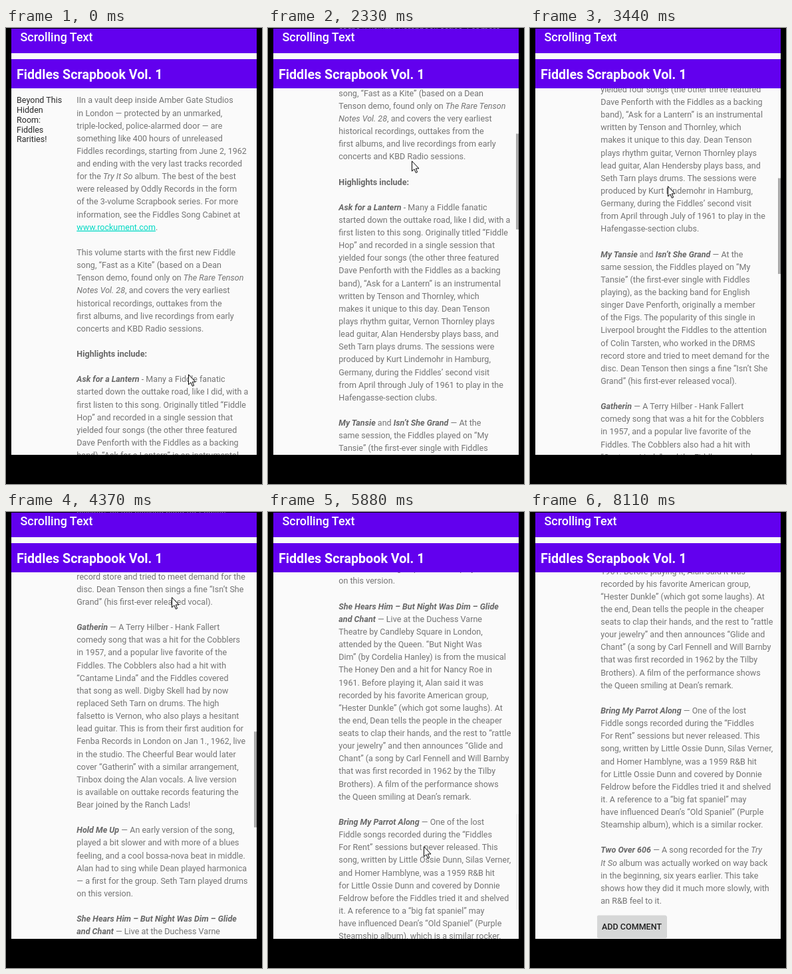
Write an HTML page that moves like this. It is 385 by 688 pixels and loops after 8980 ms.

```html
<!DOCTYPE html>
<html lang="en">
<head>
<meta charset="utf-8">
<title>Scrolling Text</title>
<style>
html, body { margin: 0; width: 100%; height: 100%; overflow: hidden; background: #000; }
svg { display: block; width: 100vw; height: 100vh; font-family: Roboto, sans-serif; font-size: 12.56px; }
#body { fill: #747474; }
#side { fill: #2a2a2a; }
.i { font-style: italic; }
.b { font-weight: 700; fill: #676767; }
.bi { font-weight: 700; font-style: italic; fill: #676767; }
.link { fill: #03dac5; text-decoration: underline; }
.head { fill: #fff; }
</style>
</head>
<body>
<svg viewBox="0 0 385 688">
  <rect width="385" height="688" fill="#000"/>
  <rect x="8" y="1" width="369" height="643" fill="#fafafa"/>
  <g id="page">
    <g id="side"></g>
    <g id="body" xml:space="preserve"></g>
    <g transform="translate(0 1550.5)">
      <rect x="101" y="609.5" width="105" height="33.5" rx="2" fill="#000" opacity=".16"/>
      <rect x="101" y="608.5" width="104.5" height="33.5" rx="2" fill="#d6d7d7"/>
      <text x="153" y="630" text-anchor="middle" font-weight="500" fill="#212121">ADD COMMENT</text>
    </g>
  </g>
  <rect id="bar" x="373" width="4" height="144.5" fill="#a9a9a9"/>
  <rect x="8" y="38" width="369" height="9" fill="#fafafa"/>
  <path d="M8 1H377V38H8ZM8 47H377V91H8Z" fill="#6200ee"/>
  <text class="head" x="21.5" y="20.3" font-size="17.94" font-weight="500">Scrolling Text</text>
  <text class="head" x="16" y="77" font-size="19.7" font-weight="700">Fiddles Scrapbook Vol. 1</text>
  <rect y="644" width="385" height="44" fill="#000"/>
  <path id="cursor" d="M.5 .8V16L4 12.8L6.4 18.4L8.6 17.4L6.3 12H11Z" fill="#fff" stroke="#000"/>
</svg>
<script>
const LOOP = 8980, PITCH = 19.133, BASE = 113.4;
const VIEW_TOP = 91, MAX_SCROLL = 1550.5, BAR_TRAVEL = 409;
const $ = id => document.getElementById(id);

// Inline marks: *bold italic*, _italic_, #bold#, ~link~
const article = `IIn a vault deep inside Amber Gate Studios
in London — protected by an unmarked,
triple-locked, police-alarmed door — are
something like 400 hours of unreleased
Fiddles recordings, starting from June 2, 1962
and ending with the very last tracks recorded
for the _Try It So_ album. The best of the best
were released by Oddly Records in the form
of the 3-volume Scrapbook series. For more
information, see the Fiddles Song Cabinet at
~www.rockument.com~.

 This volume starts with the first new Fiddle
song, “Fast as a Kite” (based on a Dean
Tenson demo, found only on _The Rare Tenson_
_Notes Vol. 28_, and covers the very earliest
historical recordings, outtakes from the
first albums, and live recordings from early
concerts and KBD Radio sessions.

 #Highlights include:#

 *Ask for a Lantern* - Many a Fiddle fanatic
started down the outtake road, like I did, with a
first listen to this song. Originally titled “Fiddle
Hop” and recorded in a single session that
yielded four songs (the other three featured
Dave Penforth with the Fiddles as a backing
band), “Ask for a Lantern” is an instrumental
written by Tenson and Thornley, which
makes it unique to this day. Dean Tenson
plays rhythm guitar, Vernon Thornley plays
lead guitar, Alan Hendersby plays bass, and
Seth Tarn plays drums. The sessions were
produced by Kurt Lindemohr in Hamburg,
Germany, during the Fiddles’ second visit
from April through July of 1961 to play in the
Hafengasse-section clubs.

 *My Tansie* and *Isn’t She Grand* — At the
same session, the Fiddles played on “My
Tansie” (the first-ever single with Fiddles
playing), as the backing band for English
singer Dave Penforth, originally a member
of the Figs. The popularity of this single in
Liverpool brought the Fiddles to the attention
of Colin Tarsten, who worked in the DRMS
record store and tried to meet demand for the
disc. Dean Tenson then sings a fine “Isn’t She
Grand” (his first-ever released vocal).

 *Gatherin* — A Terry Hilber - Hank Fallert
comedy song that was a hit for the Cobblers
in 1957, and a popular live favorite of the
Fiddles. The Cobblers also had a hit with
“Cantame Linda” and the Fiddles covered
that song as well. Digby Skell had by now
replaced Seth Tarn on drums. The high
falsetto is Vernon, who also plays a hesitant
lead guitar. This is from their first audition for
Fenba Records in London on Jan 1., 1962, live
in the studio. The Cheerful Bear would later
cover “Gatherin” with a similar arrangement,
Tinbox doing the Alan vocals. A live version
is available on outtake records featuring the
Bear joined by the Ranch Lads!

 *Hold Me Up* — An early version of the song,
played a bit slower and with more of a blues
feeling, and a cool bossa-nova beat in middle.
Alan had to sing while Dean played harmonica
— a first for the group. Seth Tarn played drums
on this version.

 *She Hears Him – But Night Was Dim – Glide*
*and Chant* — Live at the Duchess Varne
Theatre by Candleby Square in London,
attended by the Queen. “But Night Was
Dim” (by Cordelia Hanley) is from the musical
The Honey Den and a hit for Nancy Roe in
1961. Before playing it, Alan said it was
recorded by his favorite American group,
“Hester Dunkle” (which got some laughs). At
the end, Dean tells the people in the cheaper
seats to clap their hands, and the rest to “rattle
your jewelry” and then announces “Glide and
Chant” (a song by Carl Fennell and Will Barnby
that was first recorded in 1962 by the Tilby
Brothers). A film of the performance shows
the Queen smiling at Dean’s remark.

 *Bring My Parrot Along* — One of the lost
Fiddle songs recorded during the “Fiddles
For Rent” sessions but never released. This
song, written by Little Ossie Dunn, Silas Verner,
and Homer Hamblyne, was a 1959 R&B hit
for Little Ossie Dunn and covered by Donnie
Feldrow before the Fiddles tried it and shelved
it. A reference to a “big fat spaniel” may
have influenced Dean’s “Old Spaniel” (Purple
Steamship album), which is a similar rocker.

 *Two Over 606* — A song recorded for the _Try_
_It So_ album was actually worked on way back
in the beginning, six years earlier. This take
shows how they did it much more slowly, with
an R&B feel to it.`;

const sidebar = ['Beyond This', 'Hidden', 'Room:', 'Fiddles', 'Rarities!'];
const styles = { '*': 'bi', '_': 'i', '#': 'b', '~': 'link' };
const markup = s => s.replace(/&/g, '&amp;')
  .replace(/([*_#~])(.+?)\1/g, (m, c, text) => `<tspan class="${styles[c]}">${text}</tspan>`);
const column = (lines, x, pitch) => lines.map((s, i) =>
  `<text x="${x}" y="${(BASE + i * pitch).toFixed(2)}">${markup(s)}</text>`).join('');

$('body').innerHTML = column(article.split('\n'), 106.3, PITCH);
$('side').innerHTML = column(sidebar, 16, 14.72);

// Moments at which the picture refreshes
const ticks = [0, 530, 650, 770,
  1670, 1800, 1930, 2060, 2200, 2330, 2480, 2600,
  2720, 2860, 3000, 3150, 3290, 3440, 3590, 3710,
  3830, 3965, 4100, 4235, 4370, 4490, 4610,
  4880, 5010, 5150, 5290, 5430, 5550, 5700, 5880,
  6820, 6960, 7100, 7240, 7390, 7540, 7690, 7840, 7960, 8110];

// time, cursor x, cursor y, scroll
const path = [
  [0, 274, 522, 0], [490, 274, 522, 0], [770, 204, 346, 0],
  [1600, 204, 346, 0], [1930, 212, 232, 114], [2330, 216, 200, 259.5],
  [2600, 214, 330, 294], [3000, 212, 450, 302], [3440, 207, 238, 514],
  [3710, 222, 400, 612], [3965, 236, 425, 622], [4370, 249, 128, 911],
  [4610, 250, 190, 955], [4850, 250, 190, 955], [5150, 246, 275, 958],
  [5430, 242, 248, 985], [5550, 238, 60, 1190], [5700, 237, 8, 1350],
  [5880, 234, 504, 1382.5], [6780, 234, 504, 1382.5], [7100, 238, 470, 1418],
  [7390, 240, 330, MAX_SCROLL], [7840, 249, 666, MAX_SCROLL], [8110, 262, 700, MAX_SCROLL]
];

function pose(t) {
  const n = path.findIndex(k => k[0] > t);
  if (n < 0) return path[path.length - 1].slice(1);
  const a = path[n - 1], b = path[n], f = (t - a[0]) / (b[0] - a[0]);
  return [1, 2, 3].map(i => a[i] + (b[i] - a[i]) * f);
}

function barAlpha(t) {
  if (t < 1670 || t >= 8110) return 0;
  if (t >= 7960) return 0.5;
  return t >= 5880 && t < 6820 ? 0.15 : 1;
}

function draw(time) {
  const now = time % LOOP;
  const t = ticks.filter(k => k <= now).pop();
  const [x, y, scroll] = pose(t);
  $('page').setAttribute('transform', `translate(0 ${-scroll})`);
  $('cursor').setAttribute('transform', `translate(${Math.round(x)} ${Math.round(y)})`);
  $('bar').setAttribute('y', VIEW_TOP + scroll / MAX_SCROLL * BAR_TRAVEL);
  $('bar').setAttribute('opacity', barAlpha(t));
}

const start = performance.now();
function loop() {
  draw(performance.now() - start);
  requestAnimationFrame(loop);
}
loop();
</script>
</body>
</html>
```
